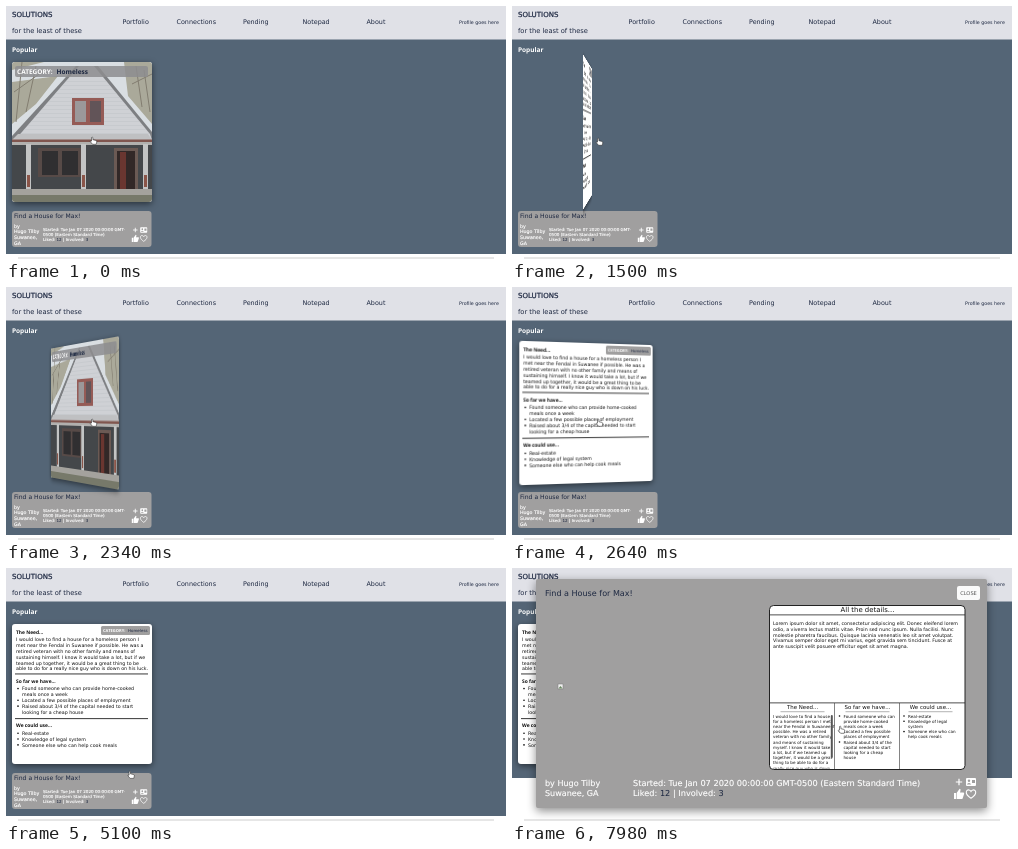
Write an HTML page that moves like this. It is 500 by 253 pixels and loops after 8 s.

```html
<!DOCTYPE html>
<html lang="en">
<head>
<meta charset="utf-8">
<title>Solutions</title>
<style>
html, body { margin: 0; width: 100%; height: 100%; overflow: hidden; background: #fff; }
svg { position: absolute; left: 0; top: 0; }
text { font-family: "DejaVu Sans", sans-serif; text-rendering: geometricPrecision; white-space: pre; }
.b { font-family: "Open Sans", sans-serif; font-weight: 700; }
.white { stroke: #fff; stroke-width: .15; }
#scene { position: absolute; left: 6px; top: 56px; width: 139.5px; height: 140px; perspective: 700px; }
#card { width: 100%; height: 100%; transform-style: preserve-3d; }
.face { position: absolute; inset: 0; overflow: hidden; border-radius: 3px; background: #fff;
  backface-visibility: hidden; box-shadow: 0 2px 6px rgba(0,0,0,.5); }
#back { transform: rotateY(180deg); }
#modal { filter: drop-shadow(0 3px 5px rgba(0,0,0,.45)); }
</style>
</head>
<body>
<svg id="page" width="500" height="253"></svg>
<div id="scene"><div id="card">
  <div class="face" id="front"></div>
  <div class="face" id="back"></div>
</div></div>
<svg id="modal" width="500" height="253"></svg>
<svg width="500" height="253">
  <path id="hand" d="M-1.5-3.5q.8-.8 1.4.2v2l3 .7q1.1.3.9 1.5l-.6 2.4h-3.6l-2.3-2.6q-.2-1 1.2-.6z"
    fill="#fff" stroke="#333" stroke-width=".6"/>
</svg>
<script>
const $ = id => document.getElementById(id);
const navy = '#1c2740', slate = '#546576', grey = '#a09f9f';

const txt = (x, y, s, size = 4.75, fill = '#111', attr = '') =>
  `<text x="${x}" y="${y}" font-size="${size}" fill="${fill}" ${attr}>${s}</text>`;
const bold = (x, y, s, size, fill) => txt(x, y, s, size, fill, 'class="b"');
const mid = (x, y, s, size, fill) => txt(x, y, s, size, fill, 'text-anchor="middle"');
const rect = (x, y, w, h, fill, attr = '') =>
  `<rect x="${x}" y="${y}" width="${w}" height="${h}" fill="${fill}" ${attr}/>`;
const poly = (pts, fill) => `<polygon points="${pts}" fill="${fill}"/>`;
const lines = (x, y, step, size, rows, fill, attr) =>
  rows.map((s, i) => txt(x, y + i * step, s, size, fill, attr)).join('');
// Rows starting with * get a bullet
const list = (x, y, step, size, rows) => rows.map((s, i) => {
  const yy = y + i * step, dot = s[0] === '*';
  return (dot ? `<circle cx="${x - 4}" cy="${yy - 1.6}" r=".8"/>` : '') + txt(x, yy, s.replace('*', ''), size);
}).join('');

const icons = (x, y, k) => `<g transform="translate(${x} ${y}) scale(${k})" fill="#fff">
  <path d="M-3.2 0H3.2M0-3.2V3.2" stroke="#fff" stroke-width="1.2"/>
  <rect x="7" y="-4" width="10" height="8" rx="1"/>
  <g fill="${grey}"><circle cx="10" cy="-1.2" r="1.2"/><path d="M7.8 2.4q2.2-2.6 4.4 0zM13-2h3v3h-3z"/></g>
  <path d="M-5 11h2v6h-2zM-2.4 11l3-4.2q1.4.2.9 1.6l-.5 2H4.6q.8.5.5 1.5L3.6 16.4q-.3.6-1 .6h-5z"/>
  <path d="M12 16.2C4.6 11.5 7.5 7 10.2 8Q11.5 8.4 12 9.4 12.5 8.4 13.8 8C16.5 7 19.4 11.5 12 16.2z"
    fill="none" stroke="#fff" stroke-width="1.1"/></g>`;

const title = 'Find a House for Max!', host = 'Hugo Tilby', white = 'class="white"';
const dark = n => `<tspan fill="${navy}" stroke="none">${n}</tspan>`;
const likes = `Liked: ${dark(12)} | Involved: ${dark(3)}`;
const started = 'Started: Tue Jan 07 2020 00:00:00 GMT-';

$('page').innerHTML =
  rect(12, 251, 476, 2, '#e6e6e6') +
  `<rect id="area" y="33" width="500" height="215" fill="${slate}"/>` +
  rect(0, 0, 500, 33.5, '#e0e1e7') +
  txt(6, 10.5, 'SOLUTIONS', 7.05, navy, `stroke="${navy}" stroke-width=".2"`) +
  txt(6, 26.5, 'for the least of these', 6.7, navy) +
  [['Portfolio', 116.5], ['Connections', 170.5], ['Pending', 237], ['Notepad', 296.5], ['About', 360.5]]
    .map(([s, x]) => txt(x, 18.4, s, 6.4, navy)).join('') +
  txt(453, 17.8, 'Profile goes here', 4.75, navy) +
  bold(6, 46.2, 'Popular', 6.5, '#fff') +
  '<g id="info">' + rect(6, 205, 139.5, 36, grey, 'rx="3"') +
  txt(8, 212.3, title, 6.1, navy) +
  lines(8, 221.7, 5.7, 4.75, ['by', host, 'Suwanee,', 'GA'], '#fff', white) +
  lines(37, 224.6, 5, 4.1, [started, '0500 (Eastern Standard Time)', likes], '#fff', white) +
  icons(129.3, 224, .7) + '</g>';

// Flat drawing of the house, in card coordinates
const post = x => rect(x, 82, 5, 50, '#c3c4c4') + rect(x + 1, 113, 3, 12, '#8a5549');
$('front').innerHTML = '<svg width="140" height="140">' +
  rect(0, 0, 140, 140, '#d9dee2') +
  '<path d="M0 8L32 0H0zM0 20L46 14 24 42 0 62zM112 0H140V62L116 34z" fill="#aaa99a"/>' +
  '<path d="M4 60L10 0M14 50L24 4M2 30L30 10M130 45L124 4M138 50L132 8M120 22L140 12" stroke="#827d70" fill="none"/>' +
  poly('64,4 0,74 0,82 140,82 140,70 86,4', '#7d7f82') +
  poly('67,4 3,78 140,78 138,72 82,4', '#cfd1d5') +
  Array.from({ length: 14 }, (_, i) => {
    const y = 19 + i * 4, left = 67 - (y - 4) * .86;
    return rect(left, y, 82 + (y - 4) * .82 - left, .4, '#bbbec3');
  }).join('') +
  rect(60, 36, 32, 27, '#955b56') + rect(63, 39, 11, 21, '#9b989a') + rect(78, 39, 11, 21, '#625458') +
  poly('6,72 136,72 140,78 0,78', '#bfc0c2') + rect(0, 77.5, 140, 2.5, '#80564f') +
  rect(0, 80, 140, 3, '#b1b0ae') + rect(0, 83, 140, 48, '#44474a') +
  rect(26, 86, 44, 29, '#574a47') + rect(30, 89, 16, 24, '#302f31') + rect(50, 89, 16, 24, '#302f31') +
  rect(102, 86, 24, 46, '#6b5a54') + rect(105, 89, 18, 43, '#322827') + rect(108, 90, 6, 41, '#6a3630') +
  [14, 69, 131].map(post).join('') +
  rect(0, 127, 140, 6, '#a4a29d') + rect(0, 133, 140, 7, '#77796a') +
  rect(3, 4, 133, 11, '#8e8e90', 'rx="2" opacity=".85"') +
  bold(5, 11.7, 'CATEGORY:', 6.5, '#fff') + bold(44.5, 11.7, 'Homeless', 6.5, navy) + '</svg>';

$('back').innerHTML = '<svg width="140" height="140" viewBox="6 56 140 140">' +
  rect(95, 58, 49, 9, grey, 'rx="1.5"') +
  bold(97, 64.2, 'CATEGORY:', 4.1, '#fff') + txt(122, 64.2, 'Homeless', 4, navy) +
  bold(10, 65.8, 'The Need...', 4.9) +
  lines(10, 73.2, 5.85, 4.75, [
    'I would love to find a house for a homeless person I',
    'met near the Fendal in Suwanee if possible. He was a',
    'retired veteran with no other family and means of',
    'sustaining himself. I know it would take a lot, but if we',
    'teamed up together, it would be a great thing to be',
    'able to do for a really nice guy who is down on his luck.']) +
  rect(9, 105.5, 133, .9, '#222') +
  bold(10, 114.8, 'So far we have...', 4.9) +
  list(16, 122.2, 5.85, 4.75, ['*Found someone who can provide home-cooked', 'meals once a week',
    '*Located a few possible places of employment',
    '*Raised about 3/4 of the capital needed to start', 'looking for a cheap house']) +
  rect(9, 150.2, 133, .9, '#222') +
  bold(10, 159.4, 'We could use...', 4.9) +
  list(16, 166.8, 5.85, 4.75, ['*Real-estate', '*Knowledge of legal system',
    '*Someone else who can help cook meals']) + '</svg>';

$('modal').innerHTML = rect(24, 11, 451, 229, grey, 'rx="2"') +
  txt(33, 28, title, 8.05, navy) +
  rect(445, 18, 23, 14, '#fafafa', 'rx="2"') + mid(456.5, 26.8, 'CLOSE', 5.1, '#555') +
  rect(46, 116, 5, 5, '#eee', 'stroke="#777" stroke-width=".5"') + poly('46.5,120.5 48.5,118 50.5,120.5', '#69875f') +
  rect(257.5, 37.5, 195.5, 164, '#fff', 'rx="4" stroke="#222"') +
  mid(355.5, 44.4, 'All the details...', 6.9) + rect(257.5, 46.5, 195.5, .8, '#222') +
  lines(261, 56.8, 5.85, 4.75, [
    'Lorem ipsum dolor sit amet, consectetur adipiscing elit. Donec eleifend lorem',
    'odio, a viverra lectus mattis vitae. Proin sed nunc ipsum. Nulla facilisi. Nunc',
    'molestie pharetra faucibus. Quisque lacinia venenatis leo sit amet volutpat.',
    'Vivamus semper dolor eget mi varius, eget gravida sem tincidunt. Fusce at',
    'ante suscipit velit posuere efficitur eget sit amet magna.']) +
  rect(257.5, 134.5, 195.5, .8, '#222') + rect(322, 135, .6, 66, '#333') + rect(387, 135, .6, 66, '#333') +
  [['The Need...', 290.5], ['So far we have...', 355.5], ['We could use...', 418.5]]
    .map(([s, x]) => mid(x, 141.4, s, 5.45) + rect(x - 22, 143.6, 44, .5, '#666')).join('') +
  '<clipPath id="cut"><path d="M258 144H453V200.8H258z"/></clipPath><g clip-path="url(#cut)">' +
  lines(261, 149.6, 5.2, 4.13, ['I would love to find a house', 'for a homeless person I met',
    'near the Fendal in Suwanee if', 'possible. He was a retired', 'veteran with no other family',
    'and means of sustaining', 'myself. I know it would take', 'a lot, but if we teamed up',
    'together, it would be a great', 'thing to be able to do for a', 'really nice guy who is down']) +
  list(331.5, 149.6, 5.2, 4.13, ['*Found someone who can', 'provide home-cooked', 'meals once a week',
    '*Located a few possible', 'places of employment', '*Raised about 3/4 of the',
    'capital needed to start', 'looking for a cheap', 'house']) +
  list(396, 149.6, 5.2, 4.13, ['*Real-estate', '*Knowledge of legal', 'system',
    '*Someone else who can', 'help cook meals']) + '</g>' +
  `<rect id="bar" x="318.8" y="147" width="2" height="43" rx="1" fill="#555"/>` +
  lines(33, 218.3, 10, 8.05, ['by ' + host, 'Suwanee, GA'], '#fff', white) +
  lines(121, 218.3, 10, 8.2, [started + '0500 (Eastern Standard Time)', likes], '#fff', white) +
  icons(447, 214, 1);

const clamp = v => Math.min(1, Math.max(0, v));

// cubic-bezier(.42, 0, .58, 1)
function ease(x) {
  let lo = 0, hi = 1;
  for (let i = 0; i < 20; i++) {
    const s = (lo + hi) / 2;
    if (3 * (1 - s) * s * ((1 - s) * .42 + s * .58) + s ** 3 < x) lo = s; else hi = s;
  }
  return lo * lo * (3 - 2 * lo);
}

// Pointer stops: time, x, y
const stops = [[0, 87, 135], [1000, 87, 136], [3600, 87, 136], [4260, 112, 190], [4740, 112, 190],
  [5460, 137, 224], [5760, 137, 224], [6000, 96, 217], [6360, 96, 217], [7020, 288, 168],
  [7200, 288, 168], [7260, 295, 162], [7740, 295, 162], [7980, 329, 162], [8000, 329, 162]];

function pointer(t) {
  const i = stops.findIndex(s => s[0] > t), [t0, x0, y0] = stops[i - 1], [t1, x1, y1] = stops[i];
  const k = ease((t - t0) / (t1 - t0));
  return `translate(${x0 + (x1 - x0) * k} ${y0 + (y1 - y0) * k})`;
}

const flip = (t, start) => ease(clamp((t - start) / 800));

function draw() {
  const t = performance.now() % 8000, open = t >= 5750;
  const turn = flip(t, 14) - flip(t, 1110) + flip(t, 2017);
  $('card').style.transform = `rotateY(${-180 * turn}deg)`;
  $('modal').style.display = open ? '' : 'none';
  $('info').style.display = open ? 'none' : '';
  $('bar').style.display = t >= 7430 ? '' : 'none';
  $('area').setAttribute('height', open ? 177 : 215);
  $('hand').setAttribute('transform', pointer(t));
  requestAnimationFrame(draw);
}
draw();
</script>
</body>
</html>
```
